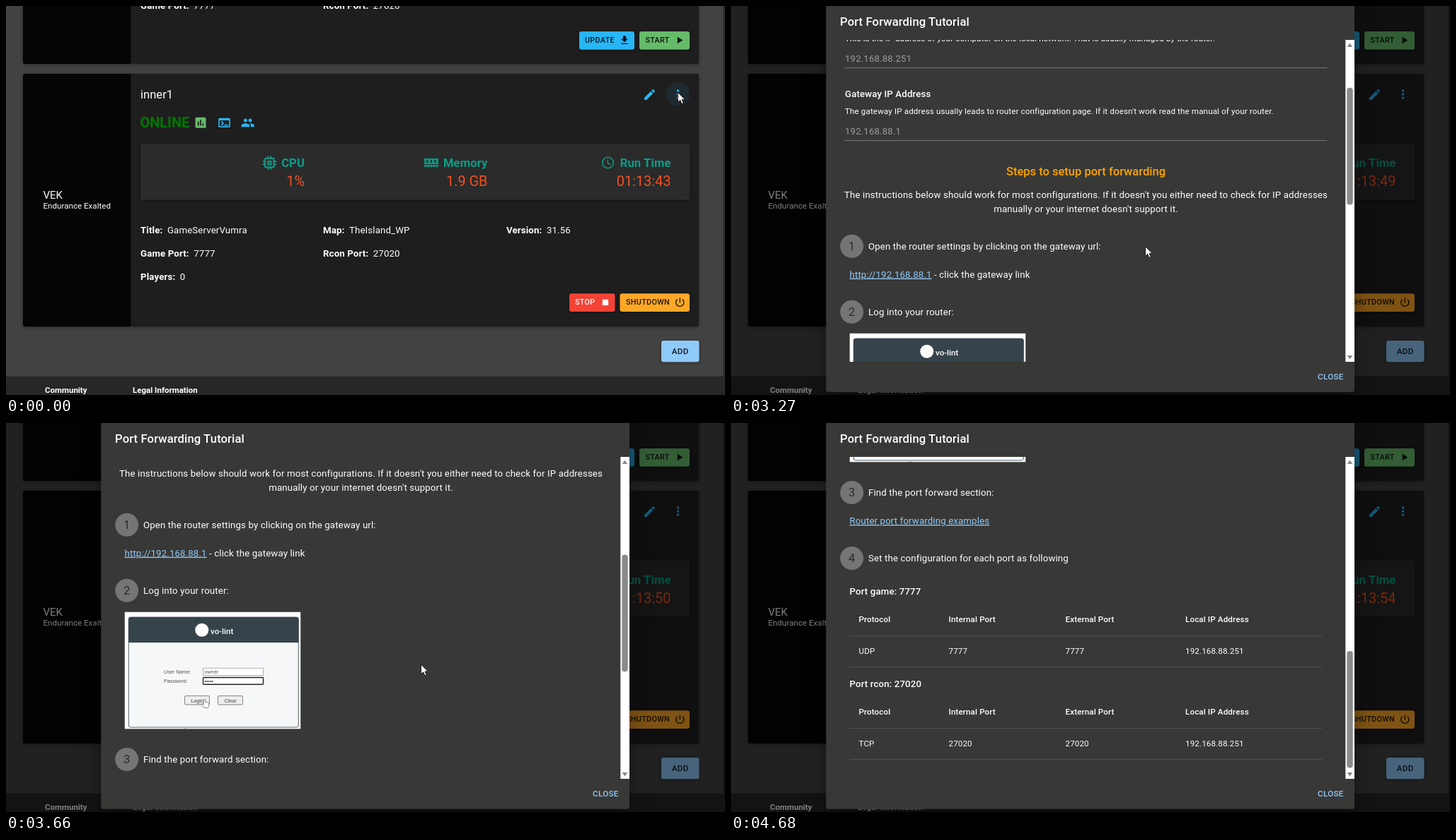
An HTML page that plays this animation: 1016 by 551 pixels, repeating every 7740 ms.

```html
<!DOCTYPE html>
<html lang="en">
<head>
<meta charset="utf-8">
<title>Port forwarding walkthrough</title>
<style>
html, body { margin: 0; width: 100%; height: 100%; overflow: hidden; background: #424242; }
svg { display: block; width: 100%; height: 100%; font-family: Roboto, Arial, sans-serif; }
.body { letter-spacing: .00938em; }
.small { letter-spacing: .01071em; }
.btn { letter-spacing: .02857em; font-weight: 500; }
.head { letter-spacing: .0075em; font-weight: 500; }
.med { font-weight: 500; }
.bold { font-weight: 700; }
.stat { font-weight: 700; letter-spacing: .0075em; }
.form { font-family: "Liberation Sans", Arial, sans-serif; }
.card { filter: drop-shadow(0 1.5px 2px rgba(0,0,0,.4)); }
.modal { filter: drop-shadow(0 12px 15px rgba(0,0,0,.35)); }
</style>
</head>
<body>
<svg id="stage" viewBox="0 0 1016 551" preserveAspectRatio="none"></svg>
<script>
const LOOP = 7740;
const BLUE = '#29b6f6', GREEN = '#66bb6a', LIGHT = '#90caf9', TEAL = '#0a9e8a', INK = 'rgba(0,0,0,.87)';
const BODY = 13.28, SMALL = 11.62, HEAD = 16.6, BIG = 19.92;

// y is the middle of the capital letters
const text = (x, y, size, s, cls = '', fill = '#fff', anchor = 'start', extra = '') =>
  `<text x="${x}" y="${(y + size * .355).toFixed(2)}" font-size="${size}" class="${cls}" fill="${fill}" text-anchor="${anchor}" ${extra}>${s}</text>`;
const rect = (x, y, w, h, fill, rx = 0, extra = '') =>
  `<rect x="${x}" y="${y}" width="${w}" height="${h}" fill="${fill}" rx="${rx}" ${extra}/>`;
const circle = (x, y, r, fill, extra = '') => `<circle cx="${x}" cy="${y}" r="${r}" fill="${fill}" ${extra}/>`;
const path = (d, extra) => `<path d="${d}" ${extra}/>`;
const line = (x1, x2, y, stroke, extra = '') => path(`M${x1} ${y}H${x2}`, `stroke="${stroke}" fill="none" ${extra}`);

const ICONS = {
  download: 'M19 9h-4V3H9v6H5l7 7 7-7zM5 18v2h14v-2H5z',
  play: 'M8 5v14l11-7z',
  stop: 'M6 6h12v12H6z',
  power: 'M13 3h-2v10h2V3zm4.83 2.17-1.42 1.42C17.99 7.86 19 9.81 19 12c0 3.87-3.13 7-7 7s-7-3.13-7-7c0-2.19 1.01-4.14 2.58-5.42L6.17 5.17C4.23 6.82 3 9.26 3 12c0 4.97 4.03 9 9 9s9-4.03 9-9c0-2.74-1.23-5.18-3.17-6.83z',
  edit: 'M3 17.25V21h3.75L17.81 9.94l-3.75-3.75zM20.71 7.04c.39-.39.39-1.02 0-1.41l-2.34-2.34c-.39-.39-1.02-.39-1.41 0l-1.83 1.83 3.75 3.75z',
  chart: 'M19 3H5c-1.1 0-2 .9-2 2v14c0 1.1.9 2 2 2h14c1.1 0 2-.9 2-2V5c0-1.1-.9-2-2-2zM9 17H7v-7h2v7zm4 0h-2V7h2v10zm4 0h-2v-4h2v4z',
  terminal: 'M20 4H4c-1.1 0-2 .9-2 2v12c0 1.1.9 2 2 2h16c1.1 0 2-.9 2-2V6c0-1.1-.9-2-2-2zm0 14H4V8h16v10zm-2-1h-6v-2h6v2zM7.5 17l-1.4-1.4L8.7 13l-2.6-2.6L7.5 9l4 4z',
  people: 'M16 11a3 3 0 1 0 0-6 3 3 0 0 0 0 6zm-8 0a3 3 0 1 0 0-6 3 3 0 0 0 0 6zm0 2c-2.33 0-7 1.17-7 3.5V19h14v-2.5c0-2.33-4.67-3.5-7-3.5zm8 0c-.29 0-.62.02-.97.05 1.16.84 1.97 1.97 1.97 3.45V19h6v-2.5c0-2.33-4.67-3.5-7-3.5z',
  chip: 'M15 9H9v6h6V9zm-2 4h-2v-2h2v2zm8-2V9h-2V7c0-1.1-.9-2-2-2h-2V3h-2v2h-2V3H9v2H7c-1.1 0-2 .9-2 2v2H3v2h2v2H3v2h2v2c0 1.1.9 2 2 2h2v2h2v-2h2v2h2v-2h2c1.1 0 2-.9 2-2v-2h2v-2h-2v-2h2zm-4 6H7V7h10v10z'
};
const icon = (name, cx, cy, size, fill) =>
  path(ICONS[name], `fill="${fill}" transform="translate(${cx} ${cy}) scale(${size / 24}) translate(-12 -12)"`);

const button = (x, y, w, fill, label, tx, ic, ix, ink = INK) =>
  rect(x, y, w, 25.7, fill, 3.3, 'class="card"') +
  text(tx, y + 12.2, 10.8, label, 'btn', ink) + icon(ic, ix, y + 12.5, 16.6, ink);

const field = (x, y, label, value) =>
  text(x, y, BODY, `<tspan font-weight="700">${label}:</tspan><tspan dx="6.5">${value}</tspan>`, 'body');

const ports = y => field(190, y, 'Game Port', '7777') + field(448, y, 'Rcon Port', '27020');

const ram = () => {
  let s = path('M591 216h20v3.2a1.6 1.6 0 0 0 0 2.6V224H591v-2.2a1.6 1.6 0 0 0 0-2.6z', `fill="${TEAL}"`);
  for (const x of [594.2, 599.7, 605.2]) s += rect(x, 218, 2.4, 4, '#2b2b2b');
  for (let i = 0; i < 5; i++) s += rect(591 + i * 4.1, 225, 3.4, 3, TEAL);
  return s;
};

const stat = (x, label, value, id = '') =>
  text(x, 222, HEAD, label, 'stat', TEAL, 'end') +
  text(x, 248, BIG, value, '', '#f4511e', 'end', id && `id="${id}"`);

const dots = [120, 125, 130].map(y => circle(949.5, y, 1.7, BLUE)).join('');

const page =
  rect(0, 0, 1016, 551, '#424242') +
  rect(24, -20, 955, 102, '#1e1e1e', 3.3, 'class="card"') + rect(24, -20, 152.5, 102, '#050505', 3.3) +
  ports(-1) +
  button(810, 36, 78, BLUE, 'UPDATE', 818, 'download', 874) +
  button(895, 36, 71, GREEN, 'START', 903.5, 'play', 951.5) +
  rect(24, 96, 955, 358, '#1e1e1e', 3.3, 'class="card"') + rect(24, 96, 152.5, 358, '#050505', 3.3) +
  text(52.5, 267.5, 15, 'VEK') + text(52.5, 283, SMALL, 'Endurance Exalted') +
  text(190, 125.5, HEAD, 'inner1', '') +
  circle(949.5, 125, 16.6, '#1f2a30', 'id="hover"') + icon('edit', 909.5, 125.5, 20, BLUE) + dots +
  text(189.5, 165.3, BIG, 'ONLINE', 'bold', '#007800') +
  icon('chart', 275, 165.3, 20, GREEN) + icon('terminal', 308.5, 165.3, 20, BLUE) + icon('people', 341.7, 165.3, 20, BLUE) +
  rect(190, 195, 776, 79.5, '#2b2b2b', 3.3, 'class="card"') +
  icon('chip', 372.3, 222, 25, TEAL) + ram() +
  circle(850.5, 222, 7.7, 'none', `stroke="${TEAL}" stroke-width="1.6"`) +
  path('M850.3 217.3v5l3.8 2.3', `fill="none" stroke="${TEAL}" stroke-width="1.3"`) +
  stat(422, 'CPU', '1%') + stat(680.5, 'Memory', '1.9 GB') + stat(939.5, 'Run Time', '', 'clock') +
  field(190, 317, 'Title', 'GameServerVumra') + field(448, 317, 'Map', 'TheIsland_WP') + field(707, 317, 'Version', '31.56') +
  ports(350.3) + field(190, 383.7, 'Players', '0') +
  button(796, 407.3, 64.5, '#f44336', 'STOP', 804, 'stop', 847, '#fff') +
  button(867.5, 407.3, 98.5, '#ffa726', 'SHUTDOWN', 876, 'power', 952.3) +
  rect(926, 474, 53.5, 30.3, LIGHT, 3.3, 'class="card"') + text(952.7, 488.5, SMALL, 'ADD', 'btn', INK, 'middle') +
  rect(0, 524.5, 1016, 27, '#272727') +
  text(55, 544, 11.5, 'Community', 'bold') + text(179, 544, 11.5, 'Legal Information', 'bold') +
  rect(1013.5, 0, 2.5, 551, '#2b2b2b');

const choice = (y, label, fill = LIGHT) => text(507.5, y, SMALL, label, 'btn', fill, 'middle');

const menu =
  rect(259, 77, 497.5, 387.5, '#383838', 3.3, 'class="modal"') +
  text(278.5, 104, HEAD, 'Configure Game Server', 'head') +
  rect(280.5, 318, 456, 30, '#566c7e', 3.3) +
  ['CONFIGURE', 'VIEW FILES', 'VIEW BACKUPS', 'DORMERS FIREWALL PORTS', 'PORT FORWARDING']
    .map((s, i) => choice(157.7 + i * 43.5, s)).join('') +
  choice(375.3, 'DELETE', '#f0492f') +
  text(704.5, 442.5, SMALL, 'CLOSE', 'btn', LIGHT);

const hand = 'M-1.7 1.5Q0-1 1.7 1.5V7l.8-.4q1.6-.5 2.1.9q1.8-.7 2.5.9q1.9-.3 1.9 1.5V13l-1.7 5.5H-1L-6.3 11.6q-.6-2 1.4-1.8l3.2 2.4z';

const address = (y, title, note, value) =>
  text(161, y, BODY, title, 'body med') + text(161, y + 24.3, SMALL, note, 'small') +
  text(161, y + 53, BODY, value, 'body', '#9b9b9b') +
  line(161, 842, y + 66.3, '#b5b5b5', 'stroke-dasharray="1 1"');

const step = (n, y, label) =>
  circle(170.7, y, 16.5, '#757575') + text(170.7, y, HEAD, n, '', '#2a2a2a', 'middle') +
  text(194, y - .2, BODY, label, 'body');

const link = (y, label, rest = '') =>
  text(167.5, y, BODY, `<tspan fill="${LIGHT}" text-decoration="underline">${label}</tspan>${rest}`, 'body');

const row = (y, cells, cls) => cells.map((s, i) => text([180.5, 307.5, 472.5, 642][i], y, SMALL, s, 'small ' + cls)).join('');
const table = (y, title, protocol, port) =>
  text(167.5, y, BODY, title, 'body med') +
  row(y + 39.5, ['Protocol', 'Internal Port', 'External Port', 'Local IP Address'], 'med') + line(167.5, 835.5, y + 63.5, '#515151') +
  row(y + 85, [protocol, port, port, '192.168.88.251'], '') + line(167.5, 835.5, y + 107.5, '#515151');

const formText = (x, y, s, fill = '#555', anchor) => text(x, y, 7.2, s, 'form', fill, anchor);
const formButton = (x, label) =>
  rect(x, 119, 35, 12.5, '#eee', 1.5, 'stroke="#777" stroke-width=".9"') + formText(x + 17.5, 125.5, label, '#444', 'middle');

const login = `<g transform="translate(167.5 609.5)" clip-path="url(#shot)">` +
  rect(0, 0, 249, 166, '#fff') +
  rect(5.8, 7.5, 240, 156, '#f5f7f8', 3, 'stroke="#56626a"') +
  path('M5.5 43.5V10.5q0-3 3-3H243q3 0 3 3v33z', 'fill="#36434b"') +
  circle(109.3, 25.7, 9.5, '#fff') + text(121.5, 27, 11.6, 'vo-lint', 'med') +
  formText(55.5, 85, 'User Name:') + formText(55.5, 98, 'Password:') +
  rect(111, 79.7, 85, 10.3, '#fff', 0, 'stroke="#aaa" stroke-width=".9"') + formText(113, 85, 'owner') +
  rect(111, 93, 85, 9.7, '#fff', 1, 'stroke="#222" stroke-width="1.4"') + formText(113, 98, '•••••', '#333') +
  formButton(85, 'Login') + formButton(132, 'Clear') +
  path(hand, 'fill="#fff" stroke="#555" stroke-width="1" transform="translate(113 123) scale(.7)"') +
  formText(126, 168, 'Copyright © 2020 All rights reserved worldwide.', '#666', 'middle') + '</g>';

const centered = (y, size, s, cls, fill) => text(501.5, y, size, s, cls, fill, 'middle');

const tutorial =
  rect(134.3, -20, 746.7, 566.7, '#383837', 3.3, 'class="modal"') +
  text(154, 22, HEAD, 'Port Forwarding Tutorial', 'head') +
  '<g clip-path="url(#view)"><g id="content">' +
  rect(154, 52, 694.5, 39.5, '#071318', 3.3) +
  circle(176.7, 71.7, 6.9, 'none', `stroke="${BLUE}" stroke-width="1.4"`) +
  rect(176, 71, 1.5, 4.2, BLUE) + rect(176, 68, 1.5, 1.5, BLUE) +
  text(195.5, 71, SMALL, 'Port configuration is needed for others to reach your game server from the internet.', 'small', '#b8e7fb') +
  centered(128, 16.5, 'Your network info', 'med', '#ffa500') +
  address(167.3, 'Internal IP Address', 'This is the IP address of your computer on the local network. That is usually managed by the router.', '192.168.88.251') +
  address(270.3, 'Gateway IP Address', "The gateway IP address usually leads to router configuration page. If it doesn't work read the manual of your router.", '192.168.88.1') +
  centered(380.5, 16.5, 'Steps to setup port forwarding', 'med', '#ffa500') +
  centered(412.8, BODY, "The instructions below should work for most configurations. If it doesn't you either need to check for IP addresses", 'body') +
  centered(432.8, BODY, "manually or your internet doesn't support it.", 'body') +
  step(1, 486.3, 'Open the router settings by clicking on the gateway url:') +
  link(526, 'http://192.168.88.1', ' - click the gateway link') +
  step(2, 579.3, 'Log into your router:') + login +
  step(3, 818.5, 'Find the port forward section:') +
  link(858.3, 'Router port forwarding examples') +
  step(4, 911.5, 'Set the configuration for each port as following') +
  table(958, 'Port game: 7777', 'UDP', '7777') +
  table(1089, 'Port rcon: 27020', 'TCP', '27020') +
  '</g></g>' +
  rect(868.3, 48, 12.7, 456, '#fff') +
  path('M870.7 58l3.8-5.5 3.8 5.5zM870.7 495l3.8 5.5 3.8-5.5z', 'fill="#8a8a8a"') +
  rect(870.3, 63, 8.4, 165.7, '#8a8a8a', 4, 'id="thumb"') +
  text(829, 524.5, SMALL, 'CLOSE', 'btn', LIGHT);

const stage = document.getElementById('stage');
stage.innerHTML =
  `<defs><clipPath id="view">${rect(134, 48, 734, 456, '#000')}</clipPath>` +
  `<clipPath id="shot">${rect(0, 0, 249, 166, '#000')}</clipPath></defs>` +
  page + rect(0, 0, 1016, 551, '#000', 0, 'id="shade" opacity=".5"') +
  `<g id="menu">${menu}${circle(535.5, 338.5, 10, '#d8b84a', 'opacity=".8"')}` +
  path(hand, 'fill="#fff" stroke="#111" stroke-width="1.1" transform="translate(536 338.5)"') + '</g>' +
  `<g id="tutorial">${tutorial}</g>` +
  path('M0 0V13.8l3.2-3 2.3 5.1 2.3-1-2.3-5H9.8z', 'id="arrow" fill="#fff" stroke="#111" stroke-width=".9"');

const el = id => document.getElementById(id);
const parts = Object.fromEntries(['hover', 'clock', 'shade', 'menu', 'tutorial', 'content', 'thumb', 'arrow'].map(id => [id, el(id)]));
const show = (id, on) => parts[id].setAttribute('display', on ? 'inline' : 'none');

// start, seconds on the clock, scroll offset, arrow position
const STATES = [
  [0, 43, 0, 949.5, 122.5],
  [1000, 47, 0],
  [3140, 47, 0, 535.7, 338.3],
  [3270, 49, 146, 585.5, 340.5],
  [3400, 49, 248, 586.5, 342],
  [3530, 50, 314, 586.5, 342],
  [3660, 50, 342, 586.5, 342],
  [4290, 51, 411, 586.5, 342],
  [4420, 52, 545, 586.5, 342],
  [4550, 53, 660, 586.5, 342],
  [4680, 54, 720]
];

function draw(t) {
  const [start, sec, scroll, x, y] = STATES.filter(s => s[0] <= t).pop();
  show('hover', start < 1000);
  show('shade', start >= 1000);
  show('menu', start === 1000);
  show('tutorial', start > 1000);
  show('arrow', x !== undefined);
  if (x !== undefined) parts.arrow.setAttribute('transform', `translate(${x} ${y})`);
  parts.clock.textContent = '01:13:' + sec;
  parts.content.setAttribute('transform', `translate(0 ${-scroll})`);
  parts.thumb.setAttribute('y', 63 + scroll * .361);
}

const begin = performance.now();
function tick() {
  draw((performance.now() - begin) % LOOP);
  requestAnimationFrame(tick);
}
tick();
</script>
</body>
</html>
```
